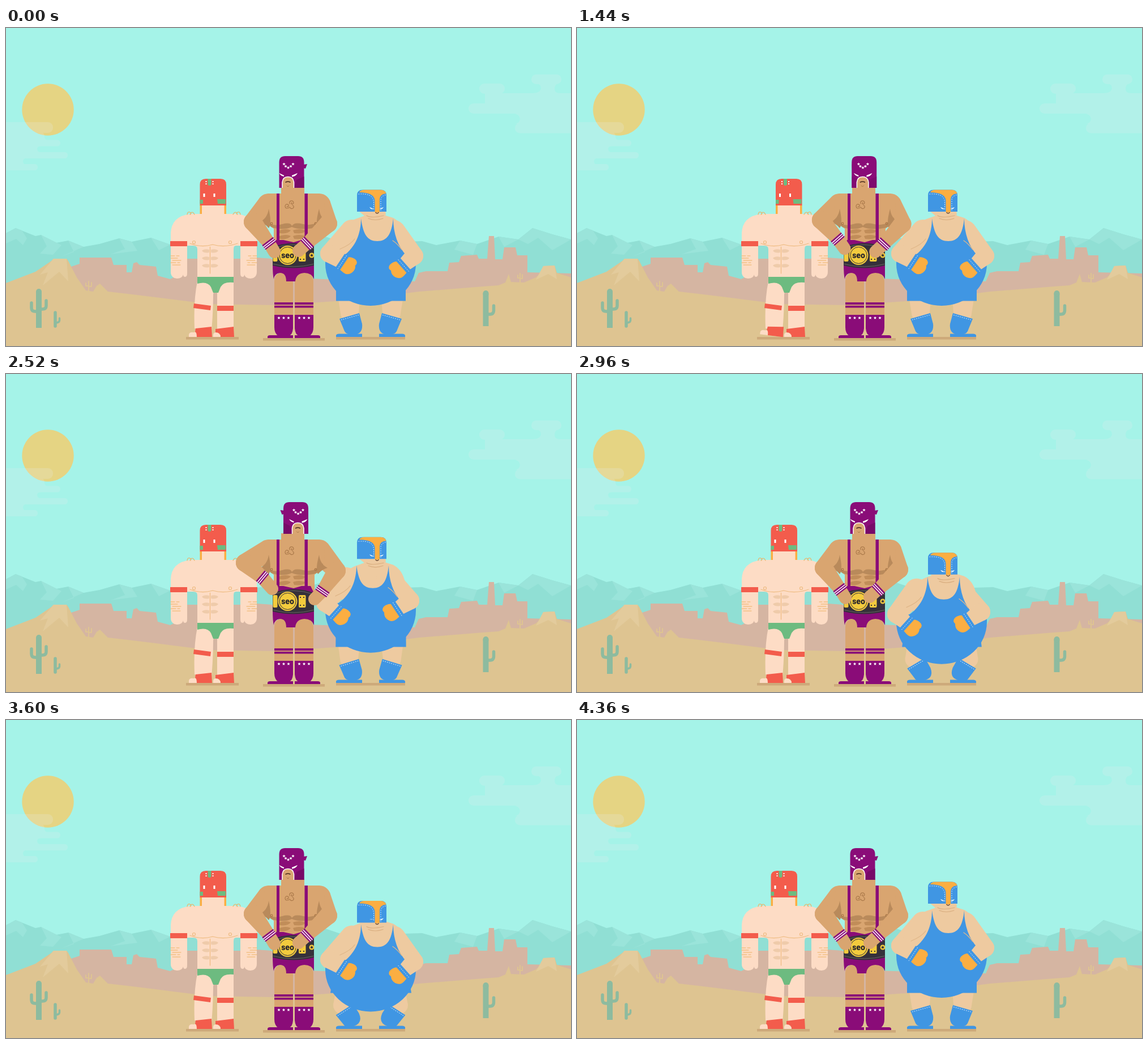
Recreate the animation shown at these times as an HTML page. Size 998 by 561 pixels, loop 4400 ms.

```html
<!DOCTYPE html>
<html lang="en">
<head>
<meta charset="utf-8">
<title>Desert wrestlers</title>
<style>
  html, body { margin: 0; width: 100%; height: 100%; overflow: hidden; background: #a5f3e8; }
  svg { display: block; width: 100%; height: 100%; }
  .line { fill: none; stroke-linecap: round; stroke-linejoin: round; }
  .purple { fill: #8a0c78; }
  .tan { fill: #d9a570; }
  .pale { fill: #fddcc5; }
  .peach { fill: #eecaa0; }
  .red { fill: #f35c4c; }
  .green { fill: #6dbb80; }
  .blue { fill: #4096e3; }
  .orange { fill: #fbae42; }
  .dots { fill: none; stroke: #fff; stroke-width: .9; stroke-dasharray: 1.6 2.2; }
  text { font: 900 14px Roboto, "Open Sans", sans-serif; text-anchor: middle; fill: #29262c; }
</style>
</head>
<body>
<svg viewBox="0 0 998 561" preserveAspectRatio="none">
  <defs>
    <path id="star" fill="#fff" d="M0-2.8L.8-.9 2.7-.9 1.2.4 1.7 2.3 0 1.2-1.7 2.3-1.2.4-2.7-.9-.8-.9Z"/>
    <g id="abs">
      <path d="M359 391Q350 389 346 393Q350 398 359 396Z"/>
      <path d="M362 391Q371 389 375 393Q371 398 362 396Z"/>
    </g>
    <g id="redArm">
      <path class="pale" d="M291 376H320V433Q320 439 316 439Q313 439 313 435Q311 442 302 442Q291 441 291 430Z"/>
      <path class="red" d="M290 376H320V385H290Z"/>
      <path class="line" stroke="#edb265" d="M291 402H298M301 402H306M291 406H303M294 410H309M291 414H300M303 414H307M294 418H308"/>
      <path class="line" stroke="#edb265" stroke-width="1.2" d="M320 329Q321 323 325 325Q328 328 325 329M326 329Q327 323 331 326L333 329"/>
    </g>
    <g id="champLeg">
      <path class="tan" d="M474 507V446Q475 431 490 431Q507 432 507 449V507Z"/>
      <path class="purple" d="M474 484H507V488H474ZM474 489.700H507V493.500H474ZM474 506H507V530Q506 541 500 543H481Q474 539 474 528Z"/>
      <path class="purple" d="M462 547V544Q463 542 466 542H507V547Z"/>
      <use href="#star" x="482" y="511.500"/><use href="#star" x="490.500" y="511.500"/><use href="#star" x="499" y="511.500"/>
    </g>
    <g id="cuff">
      <rect class="purple" x="-5" y="-12" width="10" height="24"/>
      <path stroke="#fff" stroke-width="1.500" d="M-1.500-12V12M2-12V12"/>
    </g>
    <g id="glove">
      <path class="orange" d="M2-13Q8-18 16-17Q23-15 21-8Q26-2 23 6Q19 15 10 14L2 13Z"/>
      <rect class="blue" x="-6" y="-15" width="9" height="30" rx="1"/>
      <path class="dots" d="M-1.500-14V14"/>
    </g>
    <g id="boot">
      <path class="blue" d="M589 513L624 503L629 522Q631 541 613 541Q601 541 598 535Z"/>
      <path class="dots" d="M592 515L624 506"/>
    </g>
  </defs>

  <rect width="998" height="561" fill="#a5f3e8"/>
  <circle cx="74" cy="144" r="45.700" fill="#e5d483"/>
  <g fill="#e6eeee" opacity=".21">
    <rect x="-20" y="166" width="103" height="19" rx="9"/>
    <path d="M0 184H62Q68 185 68 191Q68 198 74 198H0Z"/>
    <rect x="-20" y="197.500" width="116" height="11" rx="5.500"/>
    <path d="M0 208H62Q55 209 55 213Q55 219 62 219.500H0Z"/>
    <rect x="-20" y="219" width="129" height="11" rx="5.500"/>
    <path d="M0 229H38Q30 230 30 235Q30 241 36 241H0Z"/>
    <rect x="-20" y="240" width="76" height="11" rx="5.500"/>
  </g>
  <g fill="#e6eeee" opacity=".21">
    <rect x="928" y="82" width="53" height="17" rx="8.500"/>
    <path d="M938 98H976Q969 99 969 107Q969 115 978 115H998V134H846V115H930Q943 115 945 107Q945 99 938 98Z"/>
    <rect x="836" y="98" width="45" height="18" rx="9"/>
    <rect x="817" y="133" width="200" height="18" rx="9"/>
    <path d="M895 150H998V169H900Q908 167 908 160Q907 152 895 150Z"/>
    <rect x="899" y="168" width="120" height="17.500" rx="8.500"/>
  </g>

  <path fill="#90dfd4" d="M0 362L17 353L52 367L62 365L83 380L110 375L137 386L165 381L200 371L222 377L256 370L290 382L340 374L400 382L450 376L500 384L561 367L600 380L735 376L760 383L802 375L832 381L870 368L905 373L930 353L965 364L998 373V450H0Z"/>
  <path fill="#9ae4da" d="M17 353L28 357L37 371L30 383L18 372L0 380V362ZM62 365L72 385L60 398L83 400L98 383ZM110 375L120 395L98 403L137 386ZM200 371L210 390L185 399L232 393L222 377ZM256 370L270 392L290 382ZM802 375L792 391L825 400L832 381ZM870 368L880 386L905 373ZM930 353L905 373L922 381L940 370L965 392L998 373L965 364Z"/>
  <path fill="#d5b5a2" d="M0 450L80 425L115 421L130 416V405H186L190 418H213V431H222L225 415L231 413L236 418L265 421L268 437L290 443L316 430V407H440L443 405L470 407L480 440L560 443L722 447L729 432L742 429H780L783 414L800 413L804 402L832 400L835 407H850L853 367H862L864 408H877L880 387H900L903 401H921V431L998 433V500H0Z"/>
  <path fill="#dec491" d="M0 450L52 430L80 411L84 407H107L110 411L125 440L141 463L154 465L160 455L166 451L174 459L180 465L215 469L360 487L480 489L610 480L730 465L830 457L870 454L882 449L888 434L892 448L915 449L936 440L946 431L949 420L969 419L973 432L998 440V561H0Z"/>
  <path fill="#e3cb9c" d="M84 407L60 435L74 431L65 454L94 430L110 447L107 407ZM949 420L936 444L958 434L973 443L969 419Z"/>
  <path class="line" stroke="#dec491" stroke-width="2" d="M146 465V447M141 450V455H146M151 449V456H146M908 449V433M904 436V441H908M912 435V442H908"/>
  <g class="line" stroke="#8dbb9f">
    <path stroke-width="10" d="M58 465V529M847.500 468V526" stroke-linecap="butt"/>
    <path stroke-width="10" d="M58 465V466M847.500 468V469"/>
    <path stroke-width="5.500" d="M45 485V494Q45 500 52 500H58M71 481V490Q71 496 64 496H58M861.500 490V499Q861 505 855 505H848"/>
    <path stroke-width="5.500" d="M87 502V526"/>
    <path stroke-width="3.500" d="M94.500 512V516Q94 520 87 520"/>
  </g>
  <g fill="#cda97a">
    <rect x="318" y="545" width="93" height="4.500"/>
    <rect x="454" y="547" width="109" height="4.500"/>
    <rect x="583" y="545" width="122" height="4.500"/>
  </g>

  <g id="redMan">
    <path class="pale" d="M338 447H370L366 470Q366 500 363 534L333 530Q331 480 338 447ZM373 447H402V534H373Z"/>
    <path class="red" d="M332 486L362 490L361 498L331 494ZM373 490H402V499H373Z"/>
    <path class="green" d="M338 439H402V449Q384 447 379 457L375 467H366L362 457Q356 446 338 451Z"/>
    <g id="tapFoot">
      <path class="pale" d="M323 545V541Q324 536 331 537L346 534L352 545Z"/>
      <path class="red" d="M335 530L363 527L364 545H337Q337 537 334 536Z"/>
    </g>
    <path class="pale" d="M366 545V541Q367 536 374 537L382 545Z"/>
    <path class="red" d="M370 531L402 527L403 545H379Q379 537 370 537Z"/>
    <path class="pale" d="M291 377V362Q292 332 326 328H408Q442 332 443 362V377H414V384H406Q402 384 402 390V439H338V390Q338 384 331 384H320V377Z"/>
    <use href="#redArm"/><use href="#redArm" transform="matrix(-1 0 0 1 734 0)"/>
    <g class="line" stroke="#eebb80" stroke-width="1.200">
      <path d="M325 380Q345 388 365 382Q386 388 409 380M360.500 386V433"/>
      <circle cx="332" cy="378" r="2.500"/><circle cx="396" cy="378" r="2.500"/>
    </g>
    <g fill="#efcbaa"><use href="#abs"/><use href="#abs" y="13"/><use href="#abs" y="26"/></g>
    <g id="redHead">
      <path class="orange" d="M342.500 312H389V328H342.500Z"/>
      <path class="pale" d="M346 312H385.500V329H346Z"/>
      <path class="red" d="M342.500 313V276Q342.500 266 353 266H379Q389 266 389 276V313Z"/>
      <path class="green" d="M356.500 266H362.500V275Q362.500 278 359.500 278Q356.500 278 356.500 275ZM342.500 303H348V310H342.500ZM373 302H388V310H374Z"/>
      <path fill="#fff" d="M348.500 292H351.500V298H348.500ZM366.500 292H369.500V298H366.500ZM352.500 270h2v2h-2zM352.500 274h2v2h-2zM364.500 270h2v2h-2zM364.500 274h2v2h-2z"/>
    </g>
  </g>

  <g id="blueMan">
    <path id="thighs" class="peach"/>
    <g id="bootL"><use href="#boot"/></g>
    <g id="bootR"><use href="#boot" transform="matrix(-1 0 0 1 1288 0)"/></g>
    <path class="blue" d="M583 545V542Q584 539.500 588 539.500H629V545ZM705 545V542Q704 539.500 700 539.500H659V545Z"/>
    <path id="shorts" class="blue"/>
    <g id="blueBody">
      <path class="peach" d="M634 331L617 337Q598 345 594 358V402H704V362Q699 343 684 335L668 330Z"/>
      <path id="upperBlueL" class="peach"/><path id="upperBlueR" class="peach"/>
      <path id="suit" class="blue"/>
      <path id="foreBlueL" class="peach"/><path id="foreBlueR" class="peach"/>
      <g id="folds" class="line" stroke="#dfb688" stroke-width="1.300"><path d="M590 390Q609 382 616 372M699 391Q692 381 683 375"/></g>
      <use id="gloveL" href="#glove"/><use id="gloveR" href="#glove"/>
    </g>
    <g id="blueHead">
      <path class="peach" d="M622 322H670Q673 334 664 341H640Q634 338 634 332Z"/>
      <path class="line" stroke="#d9ae80" stroke-width="1.200" d="M637 331Q645 336 667 331M640 336Q652 341 666 336"/>
      <path class="blue" d="M620 324V295Q620 285.500 630 285.500H662Q672 285.500 672 295V324Z"/>
      <path class="orange" d="M624 290Q626 285.500 633 285.500H662Q670 286 671.500 292Q660 293 660 303V325H651.500V304Q650 290 624 290Z"/>
      <path class="dots" d="M622.500 293Q648 291 649.500 306V322M662 322V304Q662 296 671 294.500"/>
      <path d="M653 325.500Q655.500 328.500 658 325.500" class="line" stroke="#6b4a32" stroke-width="1.500"/>
      <path id="eyeL" fill="#fff" d="M642 316L649 319Q645 321 642 316Z"/>
      <path fill="#fff" d="M667 316L660 319Q664 321 667 316Z"/>
    </g>
  </g>

  <g id="champ">
    <use href="#champLeg"/><use href="#champLeg" transform="matrix(-1 0 0 1 1017 0)"/>
    <path class="purple" d="M471 415H544V443Q540 432 527 432Q512 433 511 447H495Q495 432 484 432Q474 433 473 443Q471 436 471 415Z"/>
    <path id="upperL" class="tan"/><path id="upperR" class="tan"/>
    <path class="tan" d="M486 281H527V292H553Q566 297 562 330Q556 348 545 354V385H473V354Q459 346 455 325Q454 296 463 292H486Z"/>
    <path fill="#b98a5b" d="M459 338Q470 352 488 346Q502 342 505 349Q509 342 525 346Q546 351 560 334Q557 350 543 353Q518 357 505 351Q492 357 474 353Q462 350 459 338Z"/>
    <path fill="#b98a5b" d="M464 319Q462 336 447 343Q457 344 464 353Q470 345 464 319ZM553 319Q555 336 568 342Q559 344 551 353Q546 345 553 319Z"/>
    <path fill="#c18d59" d="M483 357Q495 353 503 357Q498 364 483 362ZM507 357Q517 353 529 357Q528 364 509 362ZM483 367Q495 363 503 367Q498 374 483 372ZM507 367Q517 363 529 367Q528 374 509 372Z"/>
    <g class="line" stroke="#a97849" stroke-width="1.200">
      <path d="M500 317Q493 320 493 314Q494 309 499 312Q500 316 496 315M501 310Q500 304 506 305Q510 308 506 311Q502 310 505 308M501 316Q503 320 507 318Q510 314 506 313"/>
      <circle cx="469" cy="345" r="1.800"/><circle cx="547" cy="345" r="1.800"/>
    </g>
    <path class="purple" d="M478 292H483V376H478ZM527.500 292H533V376H527.500ZM477 374H490L508 378L522 374H538L544 386H471Z"/>
    <path fill="#35313a" d="M471 386Q508 373 544 386V419Q508 428 471 419Z"/>
    <path class="line" stroke="#77706f" stroke-width=".8" d="M472 388.500Q508 376 543 388.500M472 416.500Q508 425.500 543 416.500"/>
    <g fill="#f3cb3d">
      <rect x="471.500" y="390" width="8" height="22" rx="2"/><rect x="517" y="390" width="12.500" height="22" rx="2"/>
      <circle cx="540" cy="401" r="4.500"/><circle cx="497.500" cy="401" r="17"/>
    </g>
    <path fill="#35313a" d="M519 393h2v2h-2zM525 393h2v2h-2zM519 407h2v2h-2zM525 407h2v2h-2zM540 398l1 2h2l-1.500 1.500.5 2-2-1-2 1 .5-2-1.500-1.500h2z"/>
    <circle cx="497.500" cy="401" r="14.500" fill="none" stroke="#35313a"/>
    <text x="497.500" y="405.500">seo</text>
    <path id="foreL" class="tan"/><path id="foreR" class="tan"/>
    <use id="cuffL" href="#cuff"/><use id="cuffR" href="#cuff"/>
    <g id="champHead">
      <path id="knotR" class="purple" d="M-1 241L6 240L3 248L-1 247Z"/>
      <path id="knotL" class="purple" d="M-1 241L6 240L3 248L-1 247Z"/>
      <path class="purple" d="M482.500 282V237Q482.500 226 493 226H516Q526.500 226 526.500 237V282Z"/>
      <path id="shadeR" fill="#770a68" d="M526.500 262L513 268L509 282H526.500Z"/>
      <path id="shadeL" fill="#770a68" d="M482.500 262L494 268L498 282H482.500Z"/>
      <g id="champFace">
        <path class="tan" stroke="#fff" stroke-width="1.500" d="M488 282V272Q489 262.500 498 262.500Q507.500 262.500 508.500 272V282"/>
        <path class="line" stroke="#45291d" stroke-width="1.600" d="M494 272Q498 270 502 272"/>
        <path class="line" stroke="#a97849" d="M496 278L498 280L500 278"/>
        <path fill="#fff" d="M482.500 256L491 260V262Q485 261 482.500 256ZM515 256L505 260V262.500Q512 262 515 256Z"/>
        <use href="#star" x="491" y="240"/><use href="#star" x="494" y="244"/><use href="#star" x="498.500" y="246.500"/><use href="#star" x="503" y="244"/><use href="#star" x="507" y="240"/>
      </g>
    </g>
  </g>
</svg>
<script>
const LOOP = 4400;
const el = id => document.getElementById(id);
const set = (id, name, value) => el(id).setAttribute(name, value);
const move = (id, value) => set(id, 'transform', value);
const clamp = v => Math.min(1, Math.max(0, v));
const mix = (a, b, t) => a.map((v, i) => v + (b[i] - v) * t);

// Sine ease from 0 to 1; bend above 1 delays the middle.
const ramp = (t, from, to, bend = 1) =>
  (1 - Math.cos(Math.PI * clamp((t - from) / (to - from)) ** bend)) / 2;
const hold = (t, a, b, c, d) => ramp(t, a, b) - ramp(t, c, d);

// Tapered limbs through [x, y, radius] joints.
const disc = ([x, y, r]) =>
  `M${x - r} ${y}a${r} ${r} 0 1 1 ${2 * r} 0a${r} ${r} 0 1 1 ${-2 * r} 0z`;
const angle = (a, b) => Math.atan2(b[1] - a[1], b[0] - a[0]);
function bone(a, b) {
  const k = angle(a, b), nx = -Math.sin(k), ny = Math.cos(k);
  const at = (p, s) => `${p[0] + s * nx * p[2]} ${p[1] + s * ny * p[2]}`;
  return `M${at(a, -1)}L${at(b, -1)}L${at(b, 1)}L${at(a, 1)}Z`;
}
const limb = pts => pts.map((p, i) => disc(p) + (i ? bone(pts[i - 1], p) : '')).join('');
const flip = (pts, axis) => pts.map(([x, y, r]) => [2 * axis - x, y, r]);
const pose = (a, b, t) => a.map((p, i) => mix(p, b[i], t));

// The upper arm lies behind the clothes, the forearm in front.
function drawArm(name, pts) {
  set('upper' + name, 'd', limb(pts.slice(0, 2)));
  set('fore' + name, 'd', limb(pts.slice(1)));
}
const attach = (id, from, to, flipY = 1) =>
  move(id, `translate(${to[0]} ${to[1]}) rotate(${angle(from, to) * 180 / Math.PI}) scale(1 ${flipY})`);

const champL = [
  [[464, 313, 21], [436, 342, 16], [465, 380, 11], [474, 395, 11]],
  [[464, 313, 21], [422, 333, 16], [453, 359, 12], [470, 379, 11]]
];
const champR = [
  [[553, 313, 21], [569, 345, 16], [532, 380, 11], [517, 393, 11]],
  [[553, 313, 21], [584, 347, 16], [559, 383, 11], [545, 397, 11]]
];
const blueL = [[611, 358, 20], [571, 398, 16], [595, 414, 12]];
const blueR = [[685, 360, 21], [721, 402, 16], [701, 420, 12]];
const AXIS = 642.5;

function drawRed(t) {
  const turn = hold(t, 40, 300, 400, 740) + hold(t, 900, 1160, 1460, 1690);
  move('redHead', `translate(${8.500 * turn} 0)`);
  move('tapFoot', `rotate(${7 * turn} 362 544)`);
}

function drawChamp(t) {
  const back = ramp(t, 2530, 2880);
  const turn = ramp(t, 1090, 1700, 1.600) - back;
  const spread = turn + .12 * Math.sin(Math.PI * clamp((t - 1640) / 860));
  const left = pose(...champL, spread), right = pose(...champR, spread);
  drawArm('L', left);
  drawArm('R', right);
  attach('cuffL', left[1], left[2]);
  attach('cuffR', right[1], right[2]);
  move('champHead', `translate(${7.500 * turn} 0)`);
  move('champFace', `translate(${10 * turn} 0)`);
  move('knotR', `translate(526 0) scale(${clamp(1 - 3 * turn)} 1)`);
  move('knotL', `translate(483 0) scale(${-clamp(1.500 * turn - .5)} 1)`);
  set('shadeR', 'opacity', 1 - turn);
  set('shadeL', 'opacity', turn);
}

function drawBlue(t) {
  const squat = hold(t, 2400, 3120, 3600, 4200);
  const sway = hold(t, 2290, 2510, 3300, 3590) + hold(t, 3690, 3930, 4020, 4300);
  const nx = -8 * sway;
  const kneeX = 607 - 13 * squat;
  const thigh = [[606 - 4 * squat, 478, 19], [kneeX, 503, 16]];
  set('thighs', 'd', limb(thigh) + limb(flip(thigh, 644)));
  move('bootL', `rotate(${-17 * squat} 611 538)`);
  move('bootR', `rotate(${17 * squat} 677 538)`);

  const hem = 10 * squat;
  set('shorts', 'd', `M${583 - hem} 481.500L${583 - hem / 2} ${440 + hem}H${706 + hem / 2}L${706 + hem} 481.500Z`);
  move('blueBody', `translate(0 ${24.500 * squat})`);
  set('suit', 'd', `M${627 + nx} 336C${631 + nx} 364 ${638 + nx} 376 ${656 + nx} 376` +
    `C${673 + nx} 376 ${681 + nx} 364 ${684 + nx} 336C${684 + nx} 362 ${692 + nx} 386 ${708 + nx} 402` +
    `L724 410V416A80 74 0 0 1 564 416V410L${596 + nx} 402` +
    `C${618 + nx} 386 ${627 + nx} 362 ${627 + nx} 336Z`);
  const left = pose(blueL, flip(blueR, AXIS), sway);
  const right = pose(blueR, flip(blueL, AXIS), sway);
  drawArm('BlueL', left);
  drawArm('BlueR', right);
  move('folds', `translate(${nx} 0)`);
  attach('gloveL', left[1], left[2]);
  attach('gloveR', right[1], right[2], -1);

  move('blueHead', `translate(0 ${33.500 * squat})`);
  const wink = hold(t, 3440, 3520, 3680, 3760);
  move('eyeL', `translate(0 ${318 * .7 * wink}) scale(1 ${1 - .7 * wink})`);
}

function frame(now) {
  const t = now % LOOP;
  drawRed(t);
  drawChamp(t);
  drawBlue(t);
  requestAnimationFrame(frame);
}
frame(0);
</script>
</body>
</html>
```
